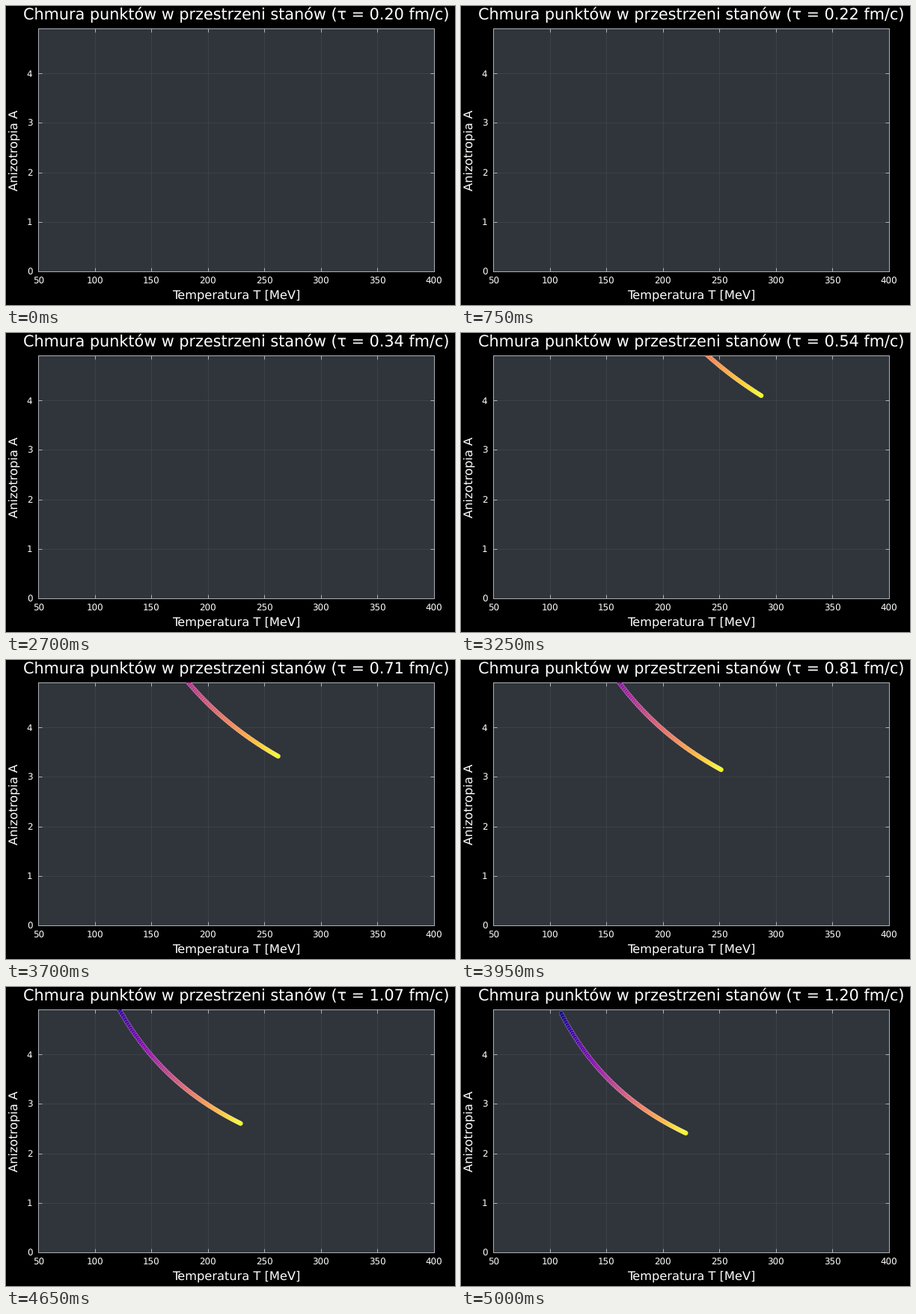
Recreate the animation shown at these times as a matplotlib script. Size 600x400 px, loop 5050 ms.

```python
import numpy as np
import matplotlib.pyplot as plt
from matplotlib.animation import FuncAnimation

W, H = 600, 400
LEFT, RIGHT, TOP, BOTTOM = 43.4, 571.9, 30.3, 355.2
PT = 0.72  # points per pixel at 100 dpi
FG = "#adb2b7"

plt.rcParams.update({
    "font.family": "DejaVu Sans",
    "text.color": "white",
    "text.hinting": "none",
})

# Slow start, then a faster sweep of proper time.
TAU = np.concatenate([np.linspace(0.2, 0.25, 50), np.linspace(0.26, 1.2, 51)])
T0 = np.linspace(200, 400, 100)
C_ETA = 1 / (4 * np.pi)

fig = plt.figure(figsize=(W / 100, H / 100), dpi=100, facecolor="black")
ax = fig.add_axes([LEFT / W, 1 - BOTTOM / H, (RIGHT - LEFT) / W, (BOTTOM - TOP) / H],
                  facecolor="#30343b")
ax.set(xlim=(50, 400), ylim=(0, 4.9),
       xticks=range(50, 401, 50), yticks=range(5))
ax.grid(color=FG, alpha=0.1, linewidth=PT)
ax.set_axisbelow(True)
ax.tick_params(direction="in", length=5 * PT, width=PT, color=FG,
               top=True, right=True, labelbottom=False, labelleft=False)
for spine in ax.spines.values():
    spine.set(color=FG, linewidth=PT)


def label(x, y, text, size, **kw):
    """Place text with its baseline at pixel (x, y), y measured from the top."""
    kw = {"ha": "center", "va": "baseline", **kw}
    return fig.text(x / W, 1 - y / H, text, fontsize=size * PT, **kw)


def x_pixel(temp):
    return LEFT + (temp - 50) / 350 * (RIGHT - LEFT)


def y_pixel(aniso):
    return BOTTOM - aniso / 4.9 * (BOTTOM - TOP)


for temp in range(50, 401, 50):
    label(x_pixel(temp), 371.5, str(temp), 11.85)
for aniso in range(5):
    label(35.4, y_pixel(aniso) + 4.6, str(aniso), 11.85, ha="right")

mid_x = (LEFT + RIGHT) / 2
title = label(mid_x, 18.25, "", 20.735)
label(mid_x, 392, "Temperatura T [MeV]", 16.3)
label(15.3, (TOP + BOTTOM) / 2, "Anizotropia A", 16.3,
      rotation=90, rotation_mode="anchor")

cloud = ax.scatter(T0, T0, s=(6 * PT) ** 2, c=T0, cmap="plasma",
                   edgecolors=(1, 1, 1, 0.6), linewidths=0.4 * PT, zorder=5)


def update(i):
    tau = TAU[i]
    temp = T0 * (0.2 / tau) ** (1 / 3)
    aniso = 8 * C_ETA / (tau * temp / 1000)
    cloud.set_offsets(np.column_stack([temp, aniso]))
    title.set_text(f"Chmura punktów w przestrzeni stanów (τ = {tau:.2f} fm/c)")
    return cloud, title


anim = FuncAnimation(fig, update, frames=len(TAU), interval=50,
                     repeat=True, repeat_delay=0)
plt.show()
```
